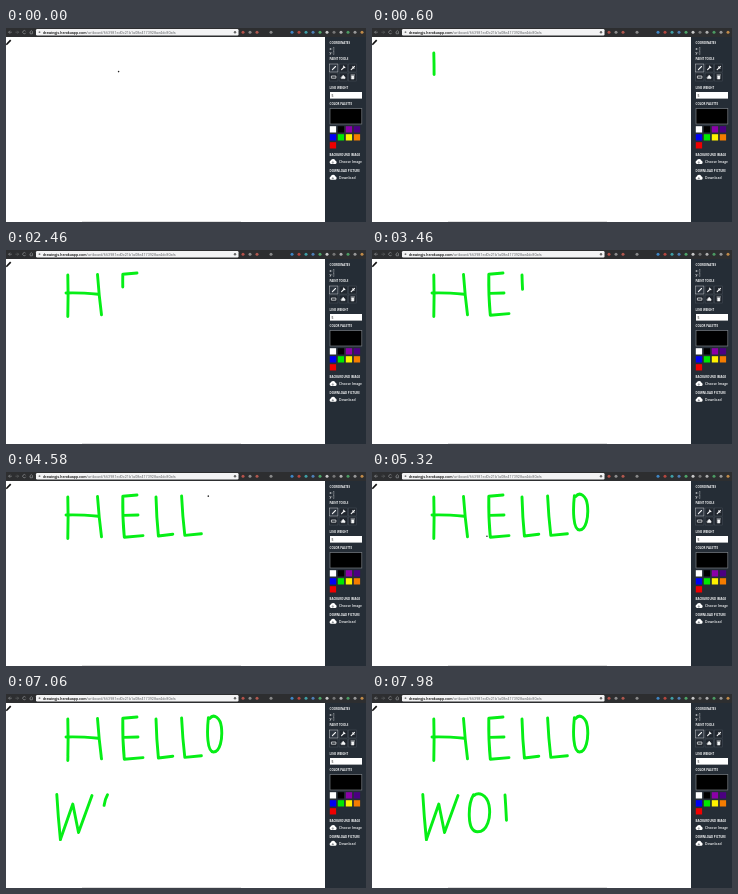
These frames come from a looping animation (360x194 px, 8000 ms). An HTML page:

```html
<!DOCTYPE html>
<html lang="en">
<head>
<meta charset="utf-8">
<title>Drawing board</title>
<style>
  html, body { margin: 0; width: 100%; height: 100%; overflow: hidden; background: #fff; }
  svg { display: block; width: 100vw; height: 100vh; }
  text { font-family: "Open Sans", "Noto Sans", sans-serif; fill: #f4f5f6; }
  .head { font-size: 2.9px; font-weight: 700; }
  .item { font-size: 3.4px; font-weight: 600; }
  .url { font-family: Roboto, sans-serif; font-size: 3.75px; fill: #66686b; }
  .url .host { fill: #111; font-weight: 500; }
  .ink path { fill: none; stroke: #06ee16; stroke-width: 2.9; stroke-linecap: round; stroke-linejoin: round; }
  .icon { fill: none; stroke: #f4f5f6; stroke-width: 1.1; stroke-linecap: round; }
</style>
</head>
<body>
<svg viewBox="0 0 360 194">
  <defs>
    <g id="cloud">
      <path d="M-1.9 2.1a1.8 1.8 0 0 1-.2-3.4a2.5 2.5 0 0 1 4.6-.2a1.9 1.9 0 0 1 .1 3.6z" fill="#fff"/>
      <path d="M0-.6V1.3M-.8.6L0 1.4L.8.6" fill="none" stroke="#252d36" stroke-width=".5"/>
    </g>
  </defs>
  <rect width="360" height="194" fill="#fff"/>
  <path d="M76 193.6H235" stroke="#d2d2d2" stroke-width=".8"/>
  <g class="ink" id="ink"></g>
  <circle id="cursor" r=".8" fill="#222"/>

  <path d="M1 16L4.7 12.2" stroke="#111" stroke-width="1.7"/>
  <path d="M0 17.2L.4 15.2L1.8 16.6z" fill="#111"/>

  <rect width="360" height="9" fill="#2d2e30"/>
  <g fill="none" stroke="#9b9da0" stroke-width=".6">
    <path d="M5.8 4.2H2.6M4 2.7L2.6 4.2L4 5.7"/>
    <path d="M9.4 4.2H12.6M11.2 2.7L12.6 4.2L11.2 5.7" stroke="#66686b"/>
    <path d="M19.6 3.2A1.6 1.6 0 1 0 19.8 4.8"/>
    <path d="M23.6 4.2L25.3 2.6L27 4.2M24.2 4V5.8H26.4V4"/>
  </g>
  <rect x="30" y="1" width="202.5" height="6.4" rx="1.2" fill="#f3f3f4"/>
  <circle cx="33.5" cy="4.2" r=".9" fill="#777"/>
  <text class="url" x="37" y="5.5"><tspan class="host">drawingjs.herokuapp.com</tspan>/artboard/663981ed0c21b1a08e4173928ae4dc80afs</text>
  <circle cx="229" cy="4.2" r="1.2" fill="#666"/>
  <g id="tabs"></g>

  <rect x="319" y="9" width="41" height="185" fill="#252d36"/>
  <g id="heads"></g>
  <text class="item" x="323.6" y="22.1">x: ]</text>
  <text class="item" x="323.6" y="25.6">y: ]</text>
  <g id="tools"></g>
  <g class="icon">
    <path d="M326.4 41.6L329.5 38.5"/>
    <path d="M335.6 41.6L338.2 39M337.4 38.2L338.9 39.7"/>
    <path d="M345.2 41.7L347.3 39.6M346.6 38.8L348 40.2M347.4 39.4L348.5 38.3"/>
    <path d="M325.8 48H329.9V50.2H325.8z" stroke-width=".7"/>
    <path d="M335.4 49.2L337.2 47.2L339 49.2V50.6H335.6z" fill="#f4f5f6" stroke-width=".6"/>
    <path d="M345.7 48H347.9V50.9H345.7zM345 47H348.6" fill="#f4f5f6" stroke-width=".7"/>
  </g>
  <rect x="324" y="64" width="32" height="6.6" fill="#fff"/>
  <text class="item" x="325.4" y="68.5" style="fill:#333">5</text>
  <rect x="324" y="80.6" width="31.8" height="15.4" fill="#000" stroke="#777c82" stroke-width=".7"/>
  <g id="palette"></g>
  <use href="#cloud" x="326.8" y="133.9"/>
  <text class="item" x="333" y="135.2">Choose Image</text>
  <use href="#cloud" x="326.8" y="149.7"/>
  <text class="item" x="333" y="151">Download</text>
</svg>
<script>
const LOOP = 8000;
const $ = id => document.getElementById(id);

function add(parent, tag, attrs, text) {
  const el = document.createElementNS("http://www.w3.org/2000/svg", tag);
  for (const key in attrs) el.setAttribute(key, attrs[key]);
  if (text) el.textContent = text;
  parent.appendChild(el);
  return el;
}

// Toolbar icons, with gaps
["#b5524a", "#8d8d8d", "#b0584e", "none", "#8a8a8a", "none", "none", "#3f86c4", "#b5473f",
 "#3f9fa5", "#4f7fb5", "#4fa568", "#c8c8c8", "#777", "#b0b0b0", "#4b9b62", "#999", "#c08a48"]
  .forEach((fill, i) => add($("tabs"), "circle", { cx: 237 + i * 7, cy: 4.2, r: 1.5, fill }));

// Sidebar
[["COORDINATES", 16.3], ["PAINT TOOLS", 32], ["LINE WEIGHT", 61], ["COLOR PALETTE", 77.4],
 ["BACKGROUND IMAGE", 128.4], ["DOWNLOAD PICTURE", 144.2]].forEach(([label, y]) =>
  add($("heads"), "text", { class: "head", x: 323.6, y }, label));

for (let i = 0; i < 6; i++)
  add($("tools"), "rect", {
    x: 323.7 + i % 3 * 9.4, y: 36 + Math.floor(i / 3) * 9, width: 8.2, height: 8,
    fill: i ? "#20262e" : "#2c343e", stroke: i ? "#48505a" : "#c5c8cc", "stroke-width": .5
  });

["#fff", "#000", "#8b00a8", "#4b0082", "#0000f5", "#00e800", "#fff200", "#f57c00", "#f00000"]
  .forEach((fill, i) => add($("palette"), "rect", {
    x: 323.8 + i % 4 * 8, y: 98.2 + Math.floor(i / 4) * 8, width: 6.3, height: 6.3, fill
  }));

// Pen strokes: start, end, path
const strokes = [
  [380, 800, "M61.8 25Q62.4 45 61.8 66.5"],
  [1010, 1430, "M60 43Q72 42.4 92.5 44.2"],
  [1640, 2010, "M91.5 24.5Q93 46 95.5 64.8"],
  [2290, 2760, "M131 23L116.8 24.2Q116.4 46 118.3 65.2L137 63.6"],
  [3000, 3200, "M117.5 43.4L132 43"],
  [3350, 3770, "M150 25Q150.5 45 152.4 64L166.8 62.2"],
  [3920, 4330, "M175.6 24Q176.6 45 178.8 63.4L195.4 61.8"],
  [4600, 5080, "M202.4 23.6C200.8 38 201 58 207.5 58C214 58 216.8 45 215.4 33C214.4 24 208 19 203.6 24.5"],
  [5900, 6145, "M50.8 100.5Q52 122 54.4 145.5"],
  [6200, 6720, "M54.4 145.5L66.8 110L72.5 138.5L86 101.5"],
  [7000, 7520, "M101.5 100.8C96 110 94.5 137.5 105.5 137.8C115.5 137.8 119.2 123 117 111C114.5 100 106.5 98 102 101.5"],
  [7780, 8080, "M133 101Q134.2 118 135 139"]
].map(([from, to, d]) => {
  const path = add($("ink"), "path", { d });
  const length = path.getTotalLength();
  const at = n => path.getPointAtLength(n);
  return { from, to, path, length, head: at(0), tail: at(length) };
});

const clamp = v => Math.max(0, Math.min(1, v));
const ease = v => v * v * (3 - 2 * v);

function moveCursor(t) {
  const i = strokes.findIndex(s => t < s.to);
  const next = strokes[i];
  const idle = next && t < next.from;
  $("cursor").setAttribute("visibility", idle ? "visible" : "hidden");
  if (!idle) return;
  const last = strokes[i - 1];
  const a = last ? last.tail : { x: 112.6, y: 43.6 }, b = next.head;
  const start = last ? last.to : 40;
  const k = ease(clamp((t - start) / (next.from - start)));
  // The trip to the second line swings out to the left
  const c = last && a.x - b.x > 100 ? { x: -45, y: 135 } : { x: (a.x + b.x) / 2, y: (a.y + b.y) / 2 };
  const mix = p => (1 - k) ** 2 * a[p] + 2 * k * (1 - k) * c[p] + k * k * b[p];
  $("cursor").setAttribute("cx", mix("x"));
  $("cursor").setAttribute("cy", mix("y"));
}

function draw(t) {
  for (const { from, to, path, length } of strokes) {
    const k = clamp((t - from) / (to - from));
    path.setAttribute("visibility", k > 0 ? "visible" : "hidden");
    path.setAttribute("stroke-dasharray", k < 1 ? `${k * length} ${length + 9}` : "none");
  }
  moveCursor(t);
}

const begin = performance.now();
function tick() {
  draw((performance.now() - begin) % LOOP);
  requestAnimationFrame(tick);
}
tick();
</script>
</body>
</html>
```
